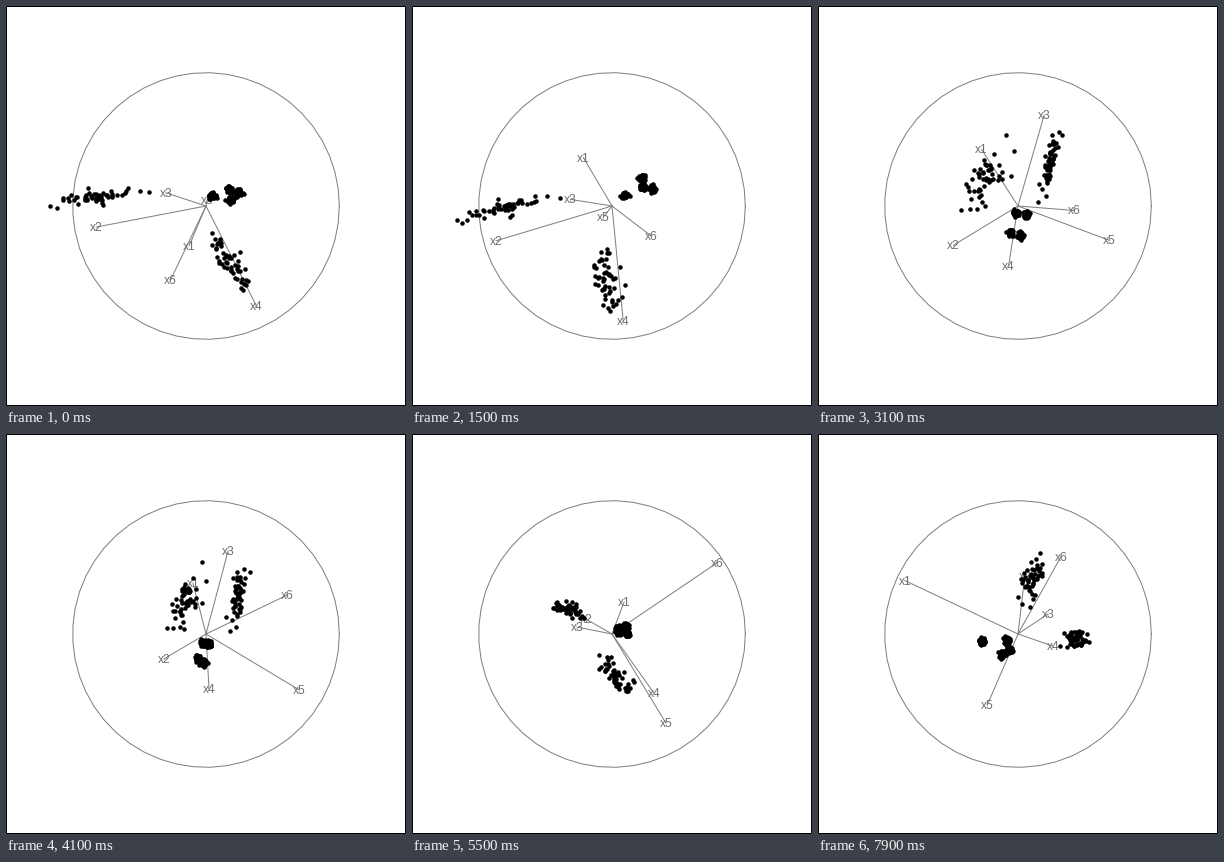
A matplotlib script for the animation above (8000 ms loop, 400 by 400 pixels).

```python
import numpy as np
import matplotlib.pyplot as plt
from matplotlib.animation import FuncAnimation
from matplotlib.patches import Rectangle

SIZE, DPI = 400, 100
MID, UNIT = SIZE / 2, SIZE / 3
FRAMES, STEP = 80, 100
PX = 72 / DPI
GREY = "#7f7f7f"


def orthonormal(m):
    u, _, vt = np.linalg.svd(m, full_matrices=False)
    return u @ vt


def geodesic(a, b, t):
    """Turn plane a towards plane b along their principal angles."""
    u, s, vt = np.linalg.svd(a.T @ b)
    ang = np.arccos(np.clip(s, -1, 1 - 1e-9))
    path = np.sin((1 - t) * ang) * (a @ u) + np.sin(t * ang) * (b @ vt.T)
    return path / np.sin(ang) @ orthonormal((1 - t) * u.T + t * vt)


# Key planes of the tour by time step: horizontal and vertical parts of x1..x6
KEYS = {
    0: ([-17, -110, -40, 50, 1, -36], [40, 22, -13, 101, -6, 75]),
    8: ([-20, -117, -52, 26, -19, 8], [-15, 32, 6, 119, 3, 51]),
    22: ([-40, -110, -16, -3, 21, 59], [-67, 40, -37, 99, 21, 15]),
    41: ([-13, -42, 22, 3, 93, 81], [-51, 25, -83, 55, 56, -39]),
    55: ([12, -26, -35, 42, 54, 105], [-32, -15, -7, 59, 89, -71]),
    66: ([-77, -39, -22, 49, -10, 86], [-45, -66, 26, 6, 86, -57]),
    79: ([-113, 7, 30, 35, -31, 43], [-53, -58, -20, 12, 71, -77]),
}
planes = {k: orthonormal(np.array(v, float).T) for k, v in KEYS.items()}


def along(t0, t1, i):
    return geodesic(planes[t0], planes[t1], (i - t0) / (t1 - t0))


# The tour changes direction where a leg, extended past its keys, ends
for t0, t1, turn in [(0, 8, 11), (41, 55, 34), (55, 66, 69)]:
    planes[turn] = along(t0, t1, turn)
times = sorted(planes)


def plane_at(i):
    k = np.clip(np.searchsorted(times, i), 1, len(times) - 1)
    return along(times[k - 1], times[k], i)


rng = np.random.default_rng(12)
axis = np.eye(6)


def cluster(center, sd, n=50):
    z = rng.normal(size=(n, 6))
    return center + (z - z.mean(0)) / z.std(0) * sd


# Two flat clusters, balanced by four tight ones around a common core
left = np.array([0, 0.74, 0.5, -0.18, 0, 0])
low = np.array([-0.05, -0.2, 0.92, 0.74, 0, 0])
core = -(left + low) / 4
shifts = np.array([0.2 * axis[1], 0.21 * axis[0], -0.115 * axis[2], 0.115 * axis[2]])
shifts -= shifts.mean(0)
data = np.vstack(
    [
        cluster(left, 0.02 + 0.145 * (axis[1] + axis[2])),
        cluster(low, 0.02 + 0.12 * (axis[2] + axis[3])),
    ]
    + [cluster(core + s, 0.012) for s in shifts]
)

fig = plt.figure(figsize=(SIZE / DPI, SIZE / DPI), dpi=DPI, facecolor="white")
ax = fig.add_axes([0, 0, 1, 1])
ax.set(xlim=(0, SIZE), ylim=(SIZE, 0))
ax.axis("off")

ax.add_patch(Rectangle((0.5, 0.5), SIZE - 1, SIZE - 1, fill=False,
                       ec="black", lw=PX, snap=False))
theta = np.linspace(0, 2 * np.pi, 50)
ax.plot(MID + UNIT * np.cos(theta), MID - UNIT * np.sin(theta), color=GREY, lw=PX)

spokes = [ax.plot([], [], color=GREY, lw=PX, zorder=2)[0] for _ in range(6)]
labels = [
    ax.text(0, 0, f"x{j + 1}", color="#6e6e6e", family="Liberation Sans",
            size=12 * PX, ha="center", va="center", zorder=3)
    for j in range(6)
]
dots, = ax.plot([], [], "o", color="black", ms=4.5 * PX, mew=0, zorder=4)


def draw(i):
    plane = plane_at(i)
    for spoke, label, (x, y) in zip(spokes, labels, MID + UNIT * plane):
        spoke.set_data([MID, x], [MID, y])
        label.set_position((x, y + 1))
    dots.set_data(*(MID + UNIT * data @ plane).T)
    return [*spokes, *labels, dots]


anim = FuncAnimation(fig, draw, frames=FRAMES, interval=STEP, repeat=True, repeat_delay=0)
plt.show()
```
